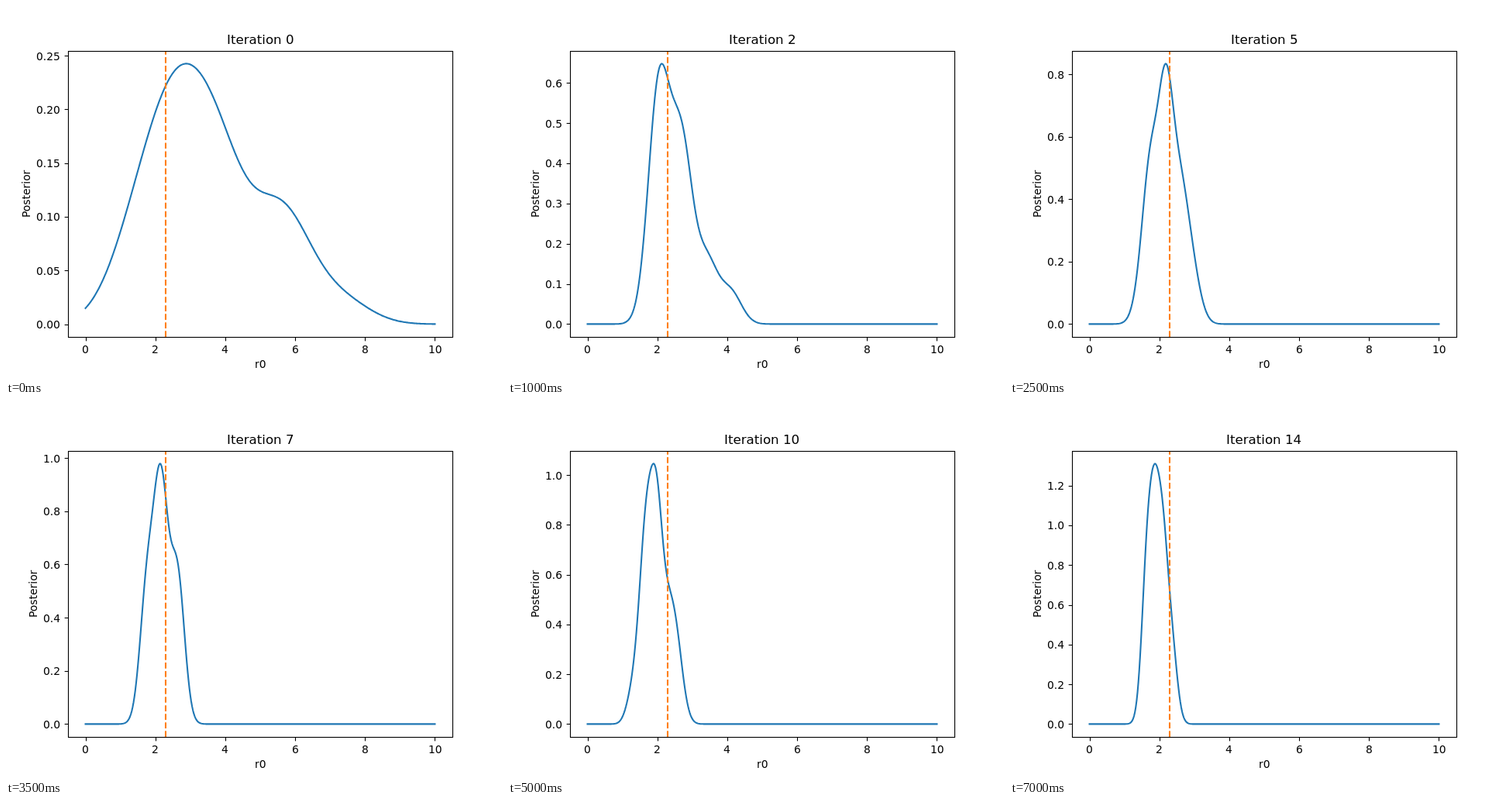
These frames come from a looping animation (640x480 px, 7.5 s). An HTML page with a canvas:

```html
<!DOCTYPE html>
<html lang="en">
<head>
<meta charset="utf-8">
<title>Posterior by iteration</title>
<style>
  html, body { margin: 0; width: 100%; height: 100%; overflow: hidden; background: #fff; }
  canvas { display: block; }
</style>
</head>
<body>
<canvas id="plot" width="640" height="480"></canvas>
<script>
const ctx = document.getElementById('plot').getContext('2d');
const STEP_MS = 500, ITERATIONS = 15, SAMPLES = 400;
const FONT = '"DejaVu Sans", Verdana, sans-serif';
const BOX = { left: 80.5, top: 58.5, right: 576.5, bottom: 427.5 };
const FLOOR_Y = 410.4, PEAK_H = 336;
const toX = r => 102.545 + r * 45.0909;

// A density is a sum of bells [share, centre]; the taller its peak, the narrower they are.
const KEYS = [
  { at: 0, peak: 0.2426, bells: [[.31, 1.52], [.645, 2.6], [.555, 3.78], [.415, 5.62], [.09, 7.3]] },
  { at: 2, peak: 0.648, bells: [[.91, 2.05], [.664, 2.7], [.23, 3.42], [.12, 4.1]] },
  { at: 4, peak: 0.774, bells: [[.615, 1.69], [.923, 2.255], [.4, 2.87]] },
  { at: 7, peak: 0.979, bells: [[.51, 1.765], [.878, 2.16], [.566, 2.63]] },
  { at: 9, peak: 0.962, bells: [[.64, 1.615], [.8, 1.985], [.55, 2.505]] },
  { at: 12, peak: 1.213, bells: [[.194, 1.255], [.66, 1.68], [.775, 1.97], [.371, 2.3]] },
  { at: 14, peak: 1.31, bells: [[.536, 1.64], [.66, 1.87], [.575, 2.11], [.253, 2.37]] }
];

function sample({ peak, bells }) {
  const spread = 0.2 / peak;
  const ys = Array.from({ length: SAMPLES + 1 }, (_, i) => {
    const r = 10 * i / SAMPLES;
    return bells.reduce((sum, [share, c]) => sum + share * Math.exp(-(((r - c) / spread) ** 2) / 2), 0);
  });
  const scale = peak / Math.max(...ys);
  return ys.map(y => y * scale);
}

const keyCurves = KEYS.map(sample);

// Iterations between two keys blend their curves.
function curveAt(n) {
  const next = Math.max(1, KEYS.findIndex(k => k.at >= n));
  const from = KEYS[next - 1].at, mix = (n - from) / (KEYS[next].at - from);
  return keyCurves[next].map((y, i) => keyCurves[next - 1][i] * (1 - mix) + y * mix);
}

function line(points, width, color) {
  ctx.beginPath();
  points.forEach(([x, y]) => ctx.lineTo(x, y));
  ctx.lineWidth = width;
  ctx.strokeStyle = color;
  ctx.stroke();
}

function text(str, x, y, align = 'center', size = 13.889) {
  ctx.font = size + 'px ' + FONT;
  ctx.fillStyle = '#000';
  const w = ctx.measureText(str).width;
  ctx.fillText(str, Math.round(align === 'right' ? x - w : x - w / 2), y);
}

function drawAxes(n, peak, toY) {
  const step = [0.05, 0.1, 0.2].find(s => peak * 1.1 / s <= 9);
  const digits = step < 0.1 ? 2 : 1;

  for (let r = 0; r <= 10; r += 2) {
    const x = Math.round(toX(r)) + 0.5;
    line([[x, BOX.bottom], [x, BOX.bottom + 4.86]], 1.11, '#000');
    text(String(r), toX(r), 448);
  }
  for (let i = 0; i * step <= peak * 1.05; i++) {
    const y = toY(i * step), tickY = Math.round(y) + 0.5;
    line([[BOX.left, tickY], [BOX.left - 4.86, tickY]], 1.11, '#000');
    text((i * step).toFixed(digits), 70.28, Math.round(y + 5.5), 'right');
  }
  ctx.lineWidth = 1.11;
  ctx.strokeRect(BOX.left, BOX.top, BOX.right - BOX.left, BOX.bottom - BOX.top);

  text('Iteration ' + n, 328, 49, 'center', 16.667);
  text('r0', 328, 467);
  ctx.save();
  ctx.translate(digits === 2 ? 31 : 40, 242);
  ctx.rotate(-Math.PI / 2);
  text('Posterior', 0, 0);
  ctx.restore();
}

function draw(n) {
  const ys = curveAt(n), peak = Math.max(...ys), low = Math.min(...ys);
  const toY = v => FLOOR_Y - (v - low) * PEAK_H / (peak - low);
  ctx.fillStyle = '#fff';
  ctx.fillRect(0, 0, 640, 480);

  ctx.lineJoin = 'round';
  ctx.lineCap = 'square';
  line(ys.map((y, i) => [toX(10 * i / SAMPLES), toY(y)]), 2.083, '#1f77b4');

  ctx.lineJoin = 'miter';
  ctx.lineCap = 'butt';
  ctx.setLineDash([7.708, 3.333]);
  line([[206, 427], [206, 58]], 2.083, '#ff7f0e');
  ctx.setLineDash([]);

  drawAxes(n, peak, toY);
}

let shown = -1;
function tick() {
  const n = Math.floor(performance.now() / STEP_MS) % ITERATIONS;
  if (n !== shown) draw(shown = n);
  requestAnimationFrame(tick);
}
tick();
</script>
</body>
</html>
```
